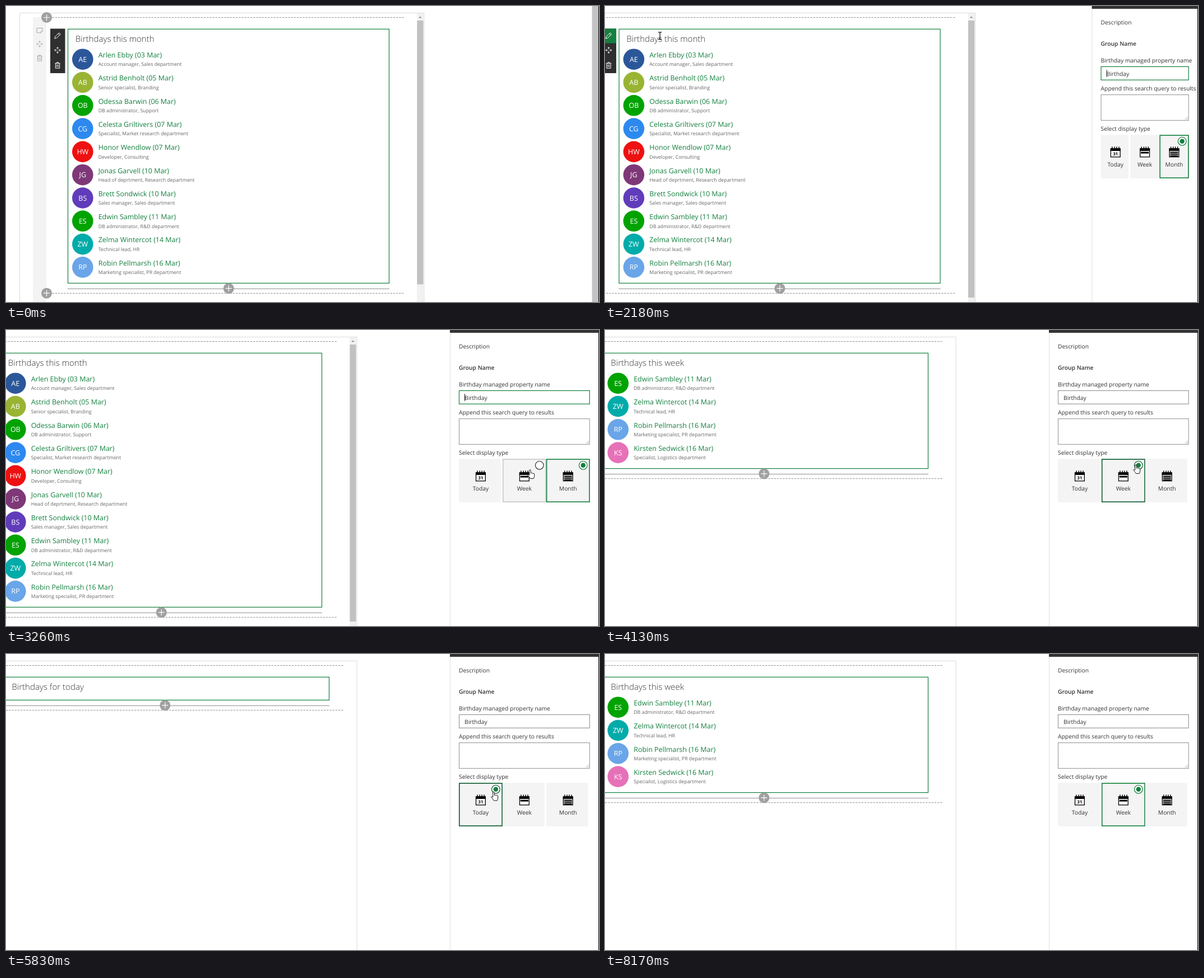
Animation of 1058x529 px, one loop 8.56 s. Source, as an HTML page:

```html
<!DOCTYPE html>
<html lang="en">
<head>
<meta charset="utf-8">
<title>Birthdays web part</title>
<style>
  html, body { margin: 0; width: 100%; height: 100%; overflow: hidden; background: #fff; }
  svg { display: block; width: 100vw; height: 100vh; }
  text { font-family: "Open Sans", "Noto Sans", sans-serif; font-size: 10.3px; fill: #333; text-rendering: geometricPrecision; }
  .title { font-size: 15.1px; font-weight: 300; }
  .name { font-size: 12.45px; fill: #14803f; }
  .name.on { fill: #0b5a2c; }
  .job { font-size: 8.8px; fill: #666; }
  .ini { font-size: 12.5px; font-weight: 400; fill: #fff; text-anchor: middle; }
  .mid { text-anchor: middle; }
  .bold { font-weight: 600; }
  .day { font-size: 7.6px; font-weight: 700; fill: #000; text-anchor: middle; }
  .ico { fill: none; stroke-width: 1; stroke-linejoin: round; }
</style>
</head>
<body>
<svg viewBox="0 0 1058 529" preserveAspectRatio="none">
  <g id="page"></g>
  <g id="pane"></g>
  <g id="cursor"></g>
</svg>
<script>
const LOOP = 8560, GREEN = '#14803f', DARK = '#0b5a2c', ROW = 41.3;

const people = [
  ['Arlen Ebby', '03', 'Account manager, Sales department', '#2b579a'],
  ['Astrid Benholt', '05', 'Senior specialist, Branding', '#99b433'],
  ['Odessa Barwin', '06', 'DB administrator, Support', '#00a300'],
  ['Celesta Griltivers', '07', 'Specialist, Market research department', '#2d89ef'],
  ['Honor Wendlow', '07', 'Developer, Consulting', '#ee1111'],
  ['Jonas Garvell', '10', 'Head of deprtment, Research department', '#7e3878'],
  ['Brett Sondwick', '10', 'Sales manager, Sales department', '#603cba'],
  ['Edwin Sambley', '11', 'DB administrator, R&amp;D department', '#00a300'],
  ['Zelma Wintercot', '14', 'Technical lead, HR', '#00aba9'],
  ['Robin Pellmarsh', '16', 'Marketing specialist, PR department', '#69a5e8'],
  ['Kirsten Sedwick', '16', 'Specialist, Logistics department', '#e671b8']
];

// start time, title ending, first and last person
const views = [
  [0, 'this month', 0, 10],
  [3970, 'this week', 0, 0],
  [4050, 'this week', 7, 11],
  [5670, 'for today', 0, 0],
  [7320, 'this week', 0, 0],
  [7470, 'this week', 7, 11]
];

const picks = [[0, 2], [3890, 1], [5590, 0], [7240, 1]];

// time, x, y of the pointer tip
const path = [
  [140, 788, 404], [560, 430, 205], [990, 205, 88], [1070, 195, 88],
  [1380, 62, 44], [1500, 62, 45], [1620, 79, 50.5], [1690, 79, 50.5],
  [1860, 91, 53], [2100, 91, 53], [2330, 111, 53.5], [2400, 111, 53.5],
  [2730, 815, 325], [2800, 822, 322], [3260, 935, 250], [3340, 935, 250],
  [3490, 947, 241], [4680, 947, 241], [5210, 870, 246.5], [6690, 870, 246.5],
  [7010, 947, 241], [7710, 947, 241], [8130, 1013, 506]
];

const icons = {
  edit: 'M5-1V-4.5H-5V3.5H-1M5.4-1.2L1.6 2.6 0 4.6 2.2 3.6 5.6.2',
  pen: 'M-5.2 5.2L-4.2 1.6 2.6-5.2 5.2-2.6-1.6 4.2ZM1-3.6L3.6-1',
  move: 'M0-5.3V-1.6M0 5.3V1.6M-5.3 0H-1.6M5.3 0H1.6M-1.8-3.5L0-5.3 1.8-3.5M-1.8 3.5L0 5.3 1.8 3.5M-3.5-1.8L-5.3 0-3.5 1.8M3.5-1.8L5.3 0 3.5 1.8',
  bin: 'M-4.6-3.6H4.6M-1.6-3.6V-5.2H1.6V-3.6M-3.6-3.6V5.2H3.6V-3.6M-1.2-1.6V3.2M1.2-1.6V3.2'
};

const shapes = {
  arrow: '<path d="M0 0V13.5L3.2 10.6 5.3 15.3 7.4 14.4 5.3 9.9H9.6Z" fill="#fff" stroke="#000" stroke-width=".9"/>',
  hand: '<path d="M-1.3 1.2a1.3 1.3 0 0 1 2.6 0V6q1.2-1 2.3.1 1.2-.8 2.2.3 1.9-.4 1.9 1.4V10.5q0 2.5-1.4 5H.3Q-1 12.5-4.3 9.3q.3-2 3 0Z" fill="#fff" stroke="#000" stroke-width=".9"/>',
  beam: '<path d="M-3-6.5Q0-6.5 0-5.5 0-6.5 3-6.5M0-5.5V5.5M-3 6.5Q0 6.5 0 5.5 0 6.5 3 6.5" fill="none" stroke="#000" stroke-width="1.2"/>'
};

const rect = (x, y, w, h, fill, stroke = 'none', sw = 1) =>
  `<rect x="${x}" y="${y}" width="${Math.max(0, w)}" height="${h}" fill="${fill}" stroke="${stroke}" stroke-width="${sw}"/>`;
const line = (x1, y1, x2, y2, stroke, more = '') =>
  `<path d="M${x1} ${y1}L${x2} ${y2}" stroke="${stroke}" ${more}/>`;
const disc = (x, y, r, fill, stroke = 'none', sw = 1.3) =>
  `<circle cx="${x}" cy="${y}" r="${r}" fill="${fill}" stroke="${stroke}" stroke-width="${sw}"/>`;
const text = (x, y, s, cls = '') => `<text x="${x}" y="${y}" class="${cls}">${s}</text>`;
const at = (x, y, s) => `<g transform="translate(${x} ${y})">${s}</g>`;
const icon = (x, y, name, color) => at(x, y, `<path class="ico" d="${icons[name]}" stroke="${color}"/>`);
const plus = (x, y) => at(x, y, disc(0, 0, 9.5, '#a0a0a0') +
  '<path d="M-5.5 0H5.5M0-5.5V5.5" stroke="#fff" stroke-width="1.2"/>');
const dashes = (y, end) => line(72, y, end, y, '#8f8f8f', 'stroke-dasharray="3.4 1.8"');

const clamp = v => Math.min(1, Math.max(0, v));
const last = (table, t) => table.filter(r => r[0] <= t).pop();

function pointer(t) {
  const i = path.findIndex(p => p[0] > t);
  if (i < 1) return null;
  const [a, b] = [path[i - 1], path[i]];
  const k = (t - a[0]) / (b[0] - a[0]);
  return { x: a[1] + (b[1] - a[1]) * k, y: a[2] + (b[2] - a[2]) * k };
}

function person([name, day, job, color], i, lit) {
  const y = i * ROW;
  const initials = name.split(' ').map(w => w[0]).join('');
  return disc(136.8, 95.2 + y, 18.8, color) +
    text(136.8, 99.7 + y, initials, 'ini') +
    text(164.7, 92 + y, `${name} (${day} Mar)`, lit ? 'name on' : 'name') +
    text(164.7, 107.4 + y, job, 'job');
}

function page(t, q, p) {
  const [, when, from, to] = last(views, t);
  const list = people.slice(from, to);
  const full = list.length > 5, wide = full ? 0 : 6.5;
  const end = 82.4 + list.length * ROW;
  const nameLit = t > 900 && t < 1150 && p && p.x > 164;
  const barLit = clamp((t - 1290) / 80) * clamp((1760 - t) / 200);
  const penLit = clamp((t - 1720) / 120);

  let frame = line(24.5, 12.5, 746.5, 12.5, '#dcdcdc') +
    line(24.5, 12.5, 24.5, 529, '#dcdcdc') + line(746, 12.5, 746, 529, '#dcdcdc');
  if (full) frame += rect(733, 13, 12.5, 516, '#f1f1f1') +
    rect(733.5, 26, 11, q ? 495 : 471.5, '#c1c1c1') +
    '<path d="M736.3 21.2L739 18.4 741.7 21.2Z" fill="#888"/>';

  const body = rect(48, 20, 24, 509, '#f3f3f3') +
    `<g opacity="${barLit}">${rect(48, 31.5, 24.5, 25, GREEN)}</g>` +
    icon(60, 44, 'edit', barLit > .3 ? '#fff' : '#a6a6a6') +
    icon(60, 68, 'move', '#a6a6a6') + icon(60, 93, 'bin', '#a6a6a6') +
    dashes(20.5, 710 + wide) + dashes(end + 18, 710 + wide) +
    plus(72.5, 20.5) + plus(72.5, end + 17.8) +
    rect(79, 40.5, 26.5, 79.5, '#2f2f2f') +
    `<g opacity="${penLit}">${rect(79, 40.5, 26.5, 26, GREEN)}</g>` +
    icon(92, 53, 'pen', '#fff') + icon(92, 79, 'move', '#fff') + icon(92, 106, 'bin', '#fff') +
    rect(110.5, 41.3, 573 + wide, end - 41.3, '#fff', GREEN, 1.2) +
    text(123.8, 64.3, 'Birthdays ' + when, 'title') +
    list.map((who, i) => person(who, i, nameLit && i === 0)).join('') +
    line(110, end + 10, 684 + wide, end + 10, '#8f8f8f') + plus(397.3, end + 9.3);

  return at(-120 * q, 0, frame) + at(-120 * q + wide, 0, body) +
    (q ? '' : rect(1045.5, 0, 11, 529, '#c3c3c3')) + rect(1056.8, 0, 1.2, 529, '#111');
}

function calendar(kind) {
  let s = [-6.6, -2.4, 1.4, 5.4].map(x => rect(x, -9.6, 1.4, 4, '#000')).join('') +
    rect(-8.4, -6, 16.8, 14.8, '#fff', '#000', 1.3) + rect(-9, -6.6, 18, 4.6, '#000');
  if (kind === 0) s += text(0, 6, '31', 'day');
  if (kind === 1) s += rect(-7, -.4, 14, 3, '#000');
  if (kind === 2) s += [-.6, 2.6, 5.8].map(y => rect(-7, y, 14, 2.2, '#000')).join('');
  return s;
}

function tile(i, x, step, on, hover) {
  const big = on || hover;
  let s = rect(x, 230.3, step - (big ? 0 : 3.2), 77.7, '#f4f4f4');
  if (on) s += rect(x + .8, 231.1, step - 1.6, 76.1, 'none', hover ? DARK : GREEN, 1.6);
  else if (hover) s += rect(x + .8, 231.1, step - 1.6, 76.1, 'none', '#c8c8c8', 1.6);
  s += at(x + step / 2, 261, calendar(i)) +
    text(x + step / 2, 287.3, ['Today', 'Week', 'Month'][i], 'mid');
  if (big) s += disc(x + step - 12, 241.8, 7.3, '#fff', on ? (hover ? DARK : GREEN) : '#333', 1.2);
  if (on) s += disc(x + step - 12, 241.8, 4.2, GREEN);
  return s;
}

function pane(t, q, p) {
  if (!q) return '';
  const left = 1058 - 266 * q, x = left + 16, w = 1041.7 - x, step = w / 3;
  const pick = last(picks, t)[1], focus = t < 3720;
  const over = t > 2780 && p && p.y > 230 && p.y < 308 ? Math.floor((p.x - x) / step) : -1;
  return rect(left, 0, 1056.8 - left, 529, '#fff') +
    line(left + .5, 0, left + .5, 529, '#e1e1e1') +
    rect(left, 0, 1058 - left, 5, '#333') +
    text(x, 32.6, 'Description') +
    text(x, 71.2, 'Group Name', 'bold') +
    text(x, 100.8, 'Birthday managed property name') +
    rect(x + .5, 108.4, w - 1, 23.8, '#fff', focus ? GREEN : '#999', 1.2) +
    text(x + 10, 124.5, 'Birthday') +
    (focus ? line(x + 10.5, 114, x + 10.5, 127, '#222') : '') +
    text(x, 151, 'Append this search query to results') +
    rect(x + .5, 158.6, w - 1, 45.8, '#fff', '#999', 1.1) +
    '<path d="M1035 203L1040 198M1038 203L1040 201" stroke="#999" stroke-width=".8"/>' +
    text(x, 223.4, 'Select display type') +
    [0, 1, 2].map(i => tile(i, x + i * step, step, i === pick, i === over)).join('');
}

function cursor(t, p) {
  if (!p) return '';
  const onTile = t > 2780 && p.y > 230 && p.y < 308;
  const kind = t > 2150 && t < 2450 ? 'beam'
    : onTile || (t > 900 && t < 2150) ? 'hand' : 'arrow';
  return at(p.x.toFixed(1), p.y.toFixed(1), shapes[kind]);
}

const shown = {};
function put(id, html) {
  if (shown[id] === html) return;
  document.getElementById(id).innerHTML = shown[id] = html;
}

function draw(now) {
  const t = now % LOOP, p = pointer(t);
  const q = 1 - (1 - clamp((t - 2020) / 474)) ** 3;
  put('page', page(t, q, p));
  put('pane', pane(t, q, p));
  put('cursor', cursor(t, p));
}

const start = performance.now();
function tick() {
  draw(performance.now() - start);
  requestAnimationFrame(tick);
}
tick();
</script>
</body>
</html>
```
